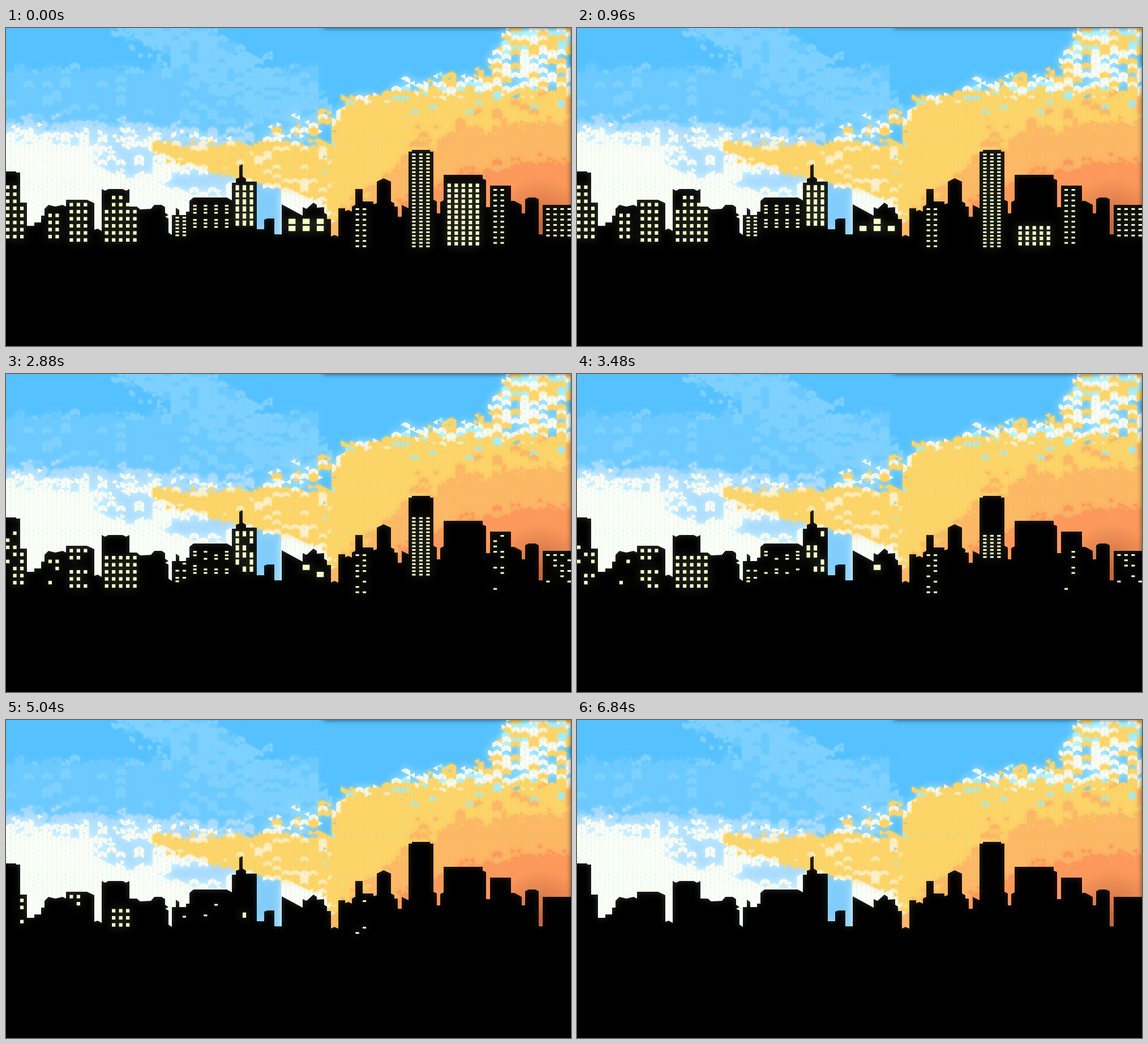
An HTML page with a canvas that plays this animation: 998x561 px, repeating every 6960 ms.

```html
<!DOCTYPE html>
<html lang="en">
<head>
<meta charset="utf-8">
<title>City at dusk</title>
<style>
html, body { margin: 0; width: 100%; height: 100%; overflow: hidden; background: #000; }
canvas { display: block; }
</style>
</head>
<body>
<canvas id="stage" width="998" height="561"></canvas>
<script>
const W = 998, H = 561, STEP = 120, STEPS = 58, UNIT = W / 160;

function layer() {
  const c = document.createElement('canvas');
  c.width = W;
  c.height = H;
  return c.getContext('2d');
}

function hash(a, b, seed) {
  const v = Math.sin(a * 127.1 + b * 311.7 + seed * 74.7) * 43758.5453;
  return v - Math.floor(v);
}

// ---------- sky: cloud edges as curves, broken up into small triangles ----------
const sky = layer();
const TRI = UNIT * 1.3;

// Painted in this order: colour, glow radius, glow colour.
const tones = {
  light: ['#6dcaff', 14],
  haze: ['#7ed1ff', 4],
  pale: ['#a9dbff', 6],
  azure: ['#83cdfb', 5],
  cyan: ['#9cefff', 8],
  white: ['#fffef4', 15, '#e4ffff'],
  cream: ['#fff3cf', 4],
  yellow: ['#ffd566', 6],
  orange: ['#ffb862', 8],
  deep: ['#ff9858', 8]
};

const inEllipse = (x, y, cx, cy, rx, ry) => ((x - cx) / rx) ** 2 + ((y - cy) / ry) ** 2 < 1;

// j scatters the edges (-1..1), r picks flecks (0..1).
function rightCloud(x, y, j, r) {
  const rise = Math.min(1, Math.max(0, (x - 845) / 50));
  const top = 122 - 0.17 * (x - 600) + 20 * Math.exp((585 - x) / 8) - 90 * rise;
  const body = 126 - 0.05 * (x - 600) + 70 * Math.exp((575 - x) / 18);
  const amber = 165 + 175 * Math.max(0, (1000 - x) / 420) ** 2.5;
  const edge = y + j * 18;
  if (edge > amber + 72) return 'deep';
  if (edge > amber || (edge > amber - 40 && r < 0.2 && x > 700)) return 'orange';
  if (edge > body) return edge < body + 35 && r > 0.88 ? 'cyan' : 'yellow';
  if (edge > top) {
    if (rise && y > 48 && r > 0.65) return null;
    return r < 0.5 ? 'white' : r < 0.82 ? 'yellow' : 'cyan';
  }
  return null;
}

function leftCloud(x, y, j, r) {
  const edge = y + j * 12, rough = y + j * 26;
  const wedge = 222 + 0.27 * (x - 262);
  if (x + j * 15 > 268 && edge > 204 && edge < wedge)
    return r < (x > 430 ? 0.36 : 0.1) ? 'cream' : 'yellow';
  if (x > 455 && Math.abs(rough - 200 + 0.35 * (x - 460)) < 17 && r < 0.6)
    return r < 0.3 ? 'white' : 'yellow';
  if (x > 428 && x < 490 && y > 270) return r < 0.15 ? 'white' : 'azure';
  const cloud = 186 + 0.05 * x;
  if (rough > cloud && (x < 440 || y > 230)) {
    const hole = inEllipse(x + j * 20, edge, 215, 232, 55, 26) || inEllipse(x + j * 20, edge, 345, 272, 70, 19);
    return hole && r < 0.8 ? 'pale' : 'white';
  }
  if (rough > cloud - 22 && x < 440) return 'pale';
  const streak = Math.abs(rough - 0.6 * (x - 275)) < 52 && y < 170 && x > 185;
  if (streak && r < 0.72) return 'haze';
  if (streak || (y + j * 14 > 72 && x < 550)) return r < 0.12 ? 'haze' : 'light';
  return null;
}

function paintSky() {
  const shapes = {};
  for (const name in tones) shapes[name] = new Path2D();
  for (let i = 0; i * TRI < W; i++) {
    for (let k = 0; k * TRI / 2 < 380; k++) {
      const clumped = n => hash(i, k, n) * 0.4 + hash(i >> 1, k >> 1, n + 50) * 0.6;
      const x = i * TRI, y = k * TRI / 2, j = clumped(1) * 2 - 1;
      const cloud = x + TRI / 2 + j * 14 > 572 ? rightCloud : leftCloud;
      const name = cloud(x + TRI / 2, y, j, hash(i >> 1, k >> 1, 7));
      if (!name) continue;
      const left = (i + k) % 2 === 0, shape = shapes[name];
      const tip = left ? x - 0.3 : x + TRI + 0.3, base = left ? x + TRI + 0.3 : x - 0.3;
      shape.moveTo(tip, y);
      shape.lineTo(base, y - TRI / 2 - 0.3);
      shape.lineTo(base, y + TRI / 2 + 0.3);
      shape.closePath();
    }
  }
  sky.fillStyle = '#55c1ff';
  sky.fillRect(0, 0, W, H);
  for (const name in tones) {
    const [fill, blur, glow = fill] = tones[name];
    sky.fillStyle = fill;
    sky.shadowColor = glow;
    sky.shadowBlur = blur;
    sky.fill(shapes[name]);
  }
  // shaded rims and dusk at the right
  sky.shadowBlur = 9;
  sky.shadowColor = '#0009';
  sky.fillStyle = '#000';
  sky.fillRect(560, -10, 440, 10);
  sky.fillRect(W, 0, 10, 320);
  sky.shadowBlur = 0;
  sky.shadowColor = 'transparent';
  const dusk = sky.createRadialGradient(945, 355, 5, 945, 355, 90);
  dusk.addColorStop(0, '#96402890');
  dusk.addColorStop(1, '#96402800');
  sky.fillStyle = dusk;
  sky.fillRect(840, 250, 158, 130);
}

// ---------- skyline, cut out of the sky ----------
const skyline = [
  'M0 561V253H18V255H25V308H37V349H50V343H62V331H68V319L75 312 87 315 100 312 106 315V303H143L156 309V356L162 354 169 358V284L175 287 181 284H206L212 287 218 284V315H231L237 320 256 319 262 312H275L281 316V326L287 330 281 333 287 336V361L293 365V561Z',
  'M293 561V330H300V317L306 321V330H318V324H324V305L331 299H390L399 304V273H406V266L412 264V243L418 240V262L424 266V271H443V355H456V338L462 336H474V364H487V311L524 331V316L531 319 543 308 549 312V317L562 316V326L567 329V337H574V368L580 365 587 368V561Z',
  'M587 561V318H599V323L605 321 611 324V315L617 312V284H630V306H649V311L655 309V271L667 265 680 271V306L686 309V315H692V333H699V312L711 318V218H717V215H749V218H755V303L761 306V327H767V307L773 304V561Z',
  'M773 561V259H842V266L848 268V316H855V278H892V305H898L911 312V327H917V302L923 299H935L941 302V364H948V312H998V561Z'
];

function cutSkyline() {
  sky.globalCompositeOperation = 'destination-out';
  sky.fillStyle = '#000';
  skyline.forEach(d => sky.fill(new Path2D(d)));
  sky.fillRect(0, 375, W, H);
}

// ---------- windows ----------
const windows = [];
const P = UNIT * 2, M = UNIT * 1.5;

// darkAt(row, column) gives the step at which a window goes dark; 0 is bare wall.
function block(x, y, cols, rows, dx, dy, w, h, darkAt) {
  for (let r = 0; r < rows; r++)
    for (let c = 0; c < cols; c++)
      windows.push({ x: x + c * dx, y: y + r * dy, w, h, off: darkAt(r, c) });
}

// Windows go dark in random order, more of them early on.
const atRandom = (from, to, seed) => (r, c) =>
  Math.ceil(from + (to - from) * hash(r + 1, c + 1, seed) ** 1.4);

const LAST = 57, FLICKER = 55;
const early = atRandom(8, 50, 3), rooms = atRandom(9, 50, 8), shop = atRandom(18, 46, 4);

block(0, 277.7, 3, 8, P, P, 6.2, 6.2, (r, c) => c === 2 && r < 3 ? 0 : early(r, c));
block(74.8, 327.5, 2, 4, P, P, 6.2, 6.2, atRandom(18, 52, 1));
block(112.3, 308.5, 3, 6, P, P, 6.2, 6.2, atRandom(18, 52, 2));
block(299.4, 333, 2, 6, P, UNIT, 6.2, 3.1, atRandom(18, 48, 5));
block(330.6, 312, 4, 7, UNIT * 3, UNIT, 6.2, 3.1, (r, c) => r === 3 ? 0 : shop(r, c));
block(405.5, 277.2, 3, 6, P, P, 6.2, 9.3, atRandom(18, 48, 6));
block(617.5, 318, 2, 8, P, M, 6.2, 3.1, (r, c) => r === 0 && c === 1 ? LAST : rooms(r, c));
block(861, 284, 2, 11, P, M, 6.2, 3.1, atRandom(9, 41, 9));
block(954.3, 317.8, 4, 6, P, M, 6.2, 3.1, atRandom(9, 41, 10));

// The low hall loses its upper corners first and its upper middle last.
block(499, 336.5, 3, 2, UNIT * 4, P, 12.4, 9.3, (r, c) => r ? 20 + 3 * c : c === 1 ? 34 : 5);

// The stepped house closes in on a point in its lower middle.
block(174.6, 296, 5, 7, P, P, 6.2, 6.2, (r, c) => {
  if (r < 2 && (c < 1 || c > r + 2)) return 0;
  const far = Math.max(Math.abs(r - 4.3), Math.abs(c - 2) * 0.75);
  return Math.max(18, Math.ceil(56 - 10.3 * far));
});

// The tall tower closes in from both ends, the wide block goes dark from the top.
block(717.3, 221.5, 3, 27, P, UNIT, 6.2, 3.1, r => 20 + Math.min(r, 26 - r));
block(779.7, 274.5, 5, 12, P, M, 6.2, 6.2, r => r + 1);

const isLit = (win, step) => step < win.off && !(win.off === LAST && step === FLICKER);

// ---------- animation ----------
const ctx = document.getElementById('stage').getContext('2d');
const lights = layer();
lights.fillStyle = '#f3ffc6';

function glow(source, radius, alpha) {
  ctx.save();
  ctx.filter = `blur(${radius}px)`;
  ctx.globalAlpha = alpha;
  ctx.drawImage(source, 0, 0);
  ctx.restore();
}

function draw(step) {
  lights.clearRect(0, 0, W, H);
  for (const win of windows)
    if (isLit(win, step)) lights.fillRect(win.x, win.y, win.w, win.h);
  ctx.fillStyle = '#000';
  ctx.fillRect(0, 0, W, H);
  glow(sky.canvas, 6, 0.2);
  glow(lights.canvas, 8, 0.4);
  ctx.drawImage(sky.canvas, 0, 0);
  ctx.drawImage(lights.canvas, 0, 0);
}

paintSky();
cutSkyline();

let shown = -1;
const start = performance.now();
function tick() {
  const step = Math.floor((performance.now() - start) / STEP) % STEPS;
  if (step !== shown) draw(shown = step);
  requestAnimationFrame(tick);
}
tick();
</script>
</body>
</html>
```
